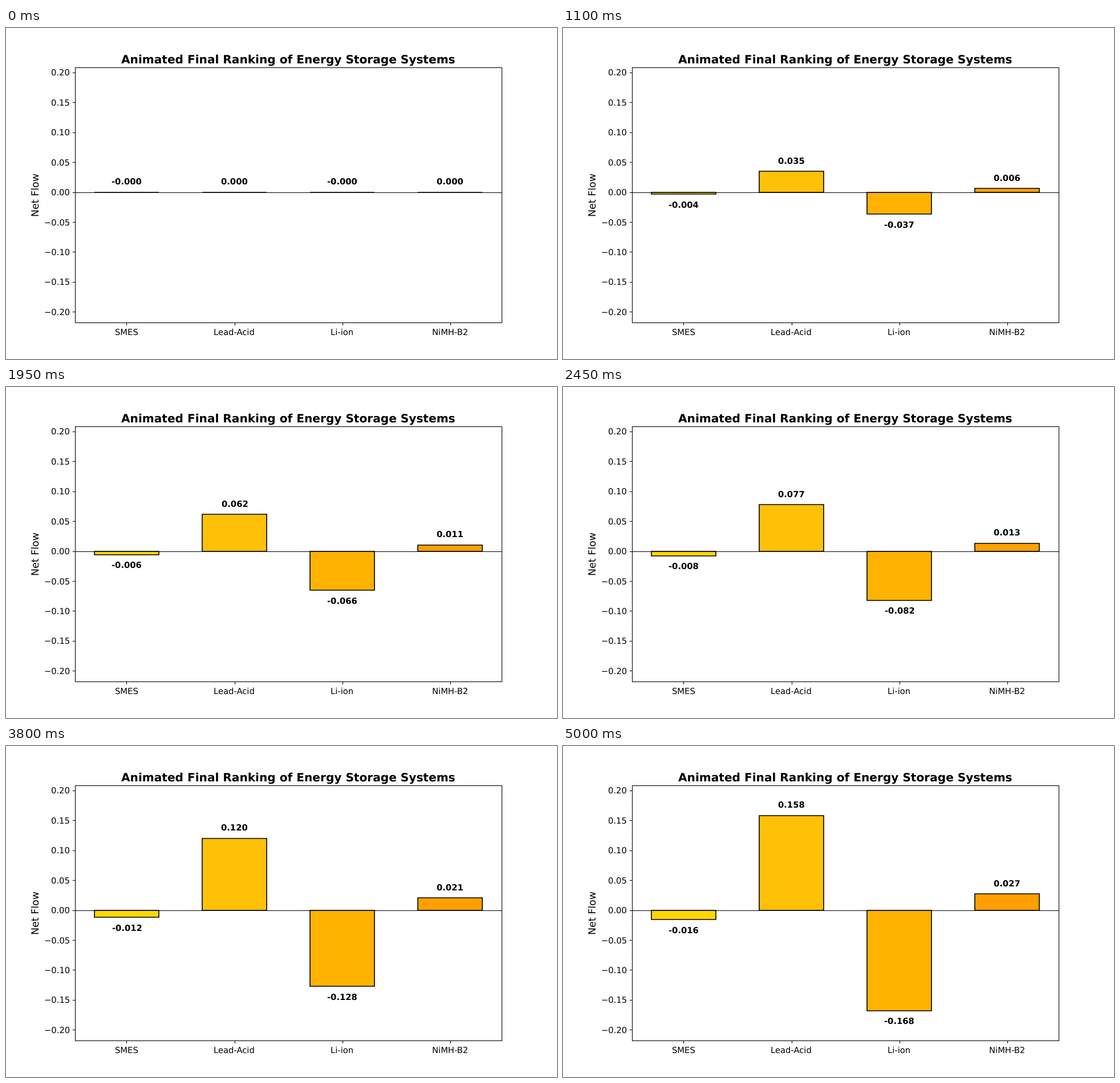
Recreate the animation shown at these times as an HTML page with a canvas. Size 966 px wide and 580 px high, loop 5.05 s.

```html
<!DOCTYPE html>
<html lang="en">
<head>
<meta charset="utf-8">
<title>Energy storage ranking</title>
<style>
  html, body { margin: 0; width: 100%; height: 100%; overflow: hidden; background: #fff; }
  canvas { display: block; }
</style>
</head>
<body>
<canvas id="chart" width="966" height="580"></canvas>
<script>
const ctx = document.getElementById('chart').getContext('2d');
ctx.textRendering = 'geometricPrecision';

const STEP_MS = 50, STEPS = 100;
const POINT = 96.6 / 72; // pixels per typographic point
const AXES = { left: 120.75, right: 869.4, top: 69.4, bottom: 516.2 };
const Y_MIN = -0.218, Y_MAX = 0.208;
const X_MIN = -0.48, X_MAX = 3.48;
const BAR_WIDTH = 0.6;
const BARS = [
  { name: 'SMES', value: -0.016, color: '#ffd700' },
  { name: 'Lead-Acid', value: 0.158, color: '#ffc107' },
  { name: 'Li-ion', value: -0.168, color: '#ffb300' },
  { name: 'NiMH-B2', value: 0.027, color: '#ffa000' }
];
const CENTER = 0.5, RIGHT = 1;

const toX = x => AXES.left + (x - X_MIN) / (X_MAX - X_MIN) * (AXES.right - AXES.left);
const toY = y => AXES.top + (Y_MAX - y) / (Y_MAX - Y_MIN) * (AXES.bottom - AXES.top);
const snap = p => Math.round(p) + 0.5; // pixel centre, for thin lines

// Aligns the inked width of the text rather than its advance width.
function text(string, x, y, points, align = CENTER, weight = 'normal') {
  ctx.font = `${weight} ${points * POINT}px "DejaVu Sans", sans-serif`;
  ctx.fillStyle = '#000';
  const { actualBoundingBoxLeft: left, actualBoundingBoxRight: right } = ctx.measureText(string);
  ctx.fillText(string, Math.round(x - (left + right) * align) + left, y);
}

function line(x1, y1, x2, y2) {
  ctx.lineWidth = 0.8 * POINT;
  ctx.beginPath();
  ctx.moveTo(x1, y1);
  ctx.lineTo(x2, y2);
  ctx.stroke();
}

function drawBar({ value, color }, index, progress) {
  const current = value * progress;
  const left = Math.round(toX(index - BAR_WIDTH / 2));
  const right = Math.round(toX(index + BAR_WIDTH / 2));
  const base = Math.round(toY(0)), end = Math.round(toY(current));
  ctx.beginPath();
  ctx.rect(left, Math.min(base, end), right - left, Math.abs(end - base));
  ctx.fillStyle = color;
  ctx.fill();
  ctx.lineWidth = 1.2 * POINT;
  ctx.stroke();

  const label = (value < 0 ? '-' : '') + Math.abs(current).toFixed(3);
  const offset = current >= 0 ? -13.4 : 23.3;
  text(label, toX(index), Math.round(toY(current) + offset), 11, CENTER, 'bold');
}

function drawAxes() {
  const left = snap(AXES.left), right = snap(AXES.right);
  const top = snap(AXES.top), bottom = snap(AXES.bottom);
  const tick = 3.5 * POINT;

  line(left, snap(toY(0)), right, snap(toY(0)));
  ctx.strokeRect(left, top, right - left, bottom - top);

  for (let i = -4; i <= 4; i++) {
    const value = i * 0.05, y = toY(value);
    line(left - tick, snap(y), left, snap(y));
    const label = (i < 0 ? '\u2212' : '') + Math.abs(value).toFixed(2);
    text(label, AXES.left - 2 * tick, Math.round(y + 5.6), 11, RIGHT);
  }
  BARS.forEach(({ name }, i) => {
    const x = toX(i);
    line(snap(x), bottom, snap(x), bottom + tick);
    text(name, x, 538, 11);
  });

  text('Animated Final Ranking of Energy Storage Systems',
    (AXES.left + AXES.right) / 2, 62, 15, CENTER, 'bold');
  ctx.save();
  ctx.translate(57, Math.round((AXES.top + AXES.bottom) / 2));
  ctx.rotate(-Math.PI / 2);
  text('Net Flow', 0, 0, 13);
  ctx.restore();
}

const start = performance.now();

function render(now) {
  const elapsed = Math.max(0, now - start);
  const step = Math.floor(elapsed / STEP_MS) % (STEPS + 1);
  ctx.fillStyle = '#fff';
  ctx.fillRect(0, 0, 966, 580);
  ctx.strokeStyle = '#000';
  BARS.forEach((bar, i) => drawBar(bar, i, step / STEPS));
  drawAxes();
  requestAnimationFrame(render);
}

render(start);
</script>
</body>
</html>
```
